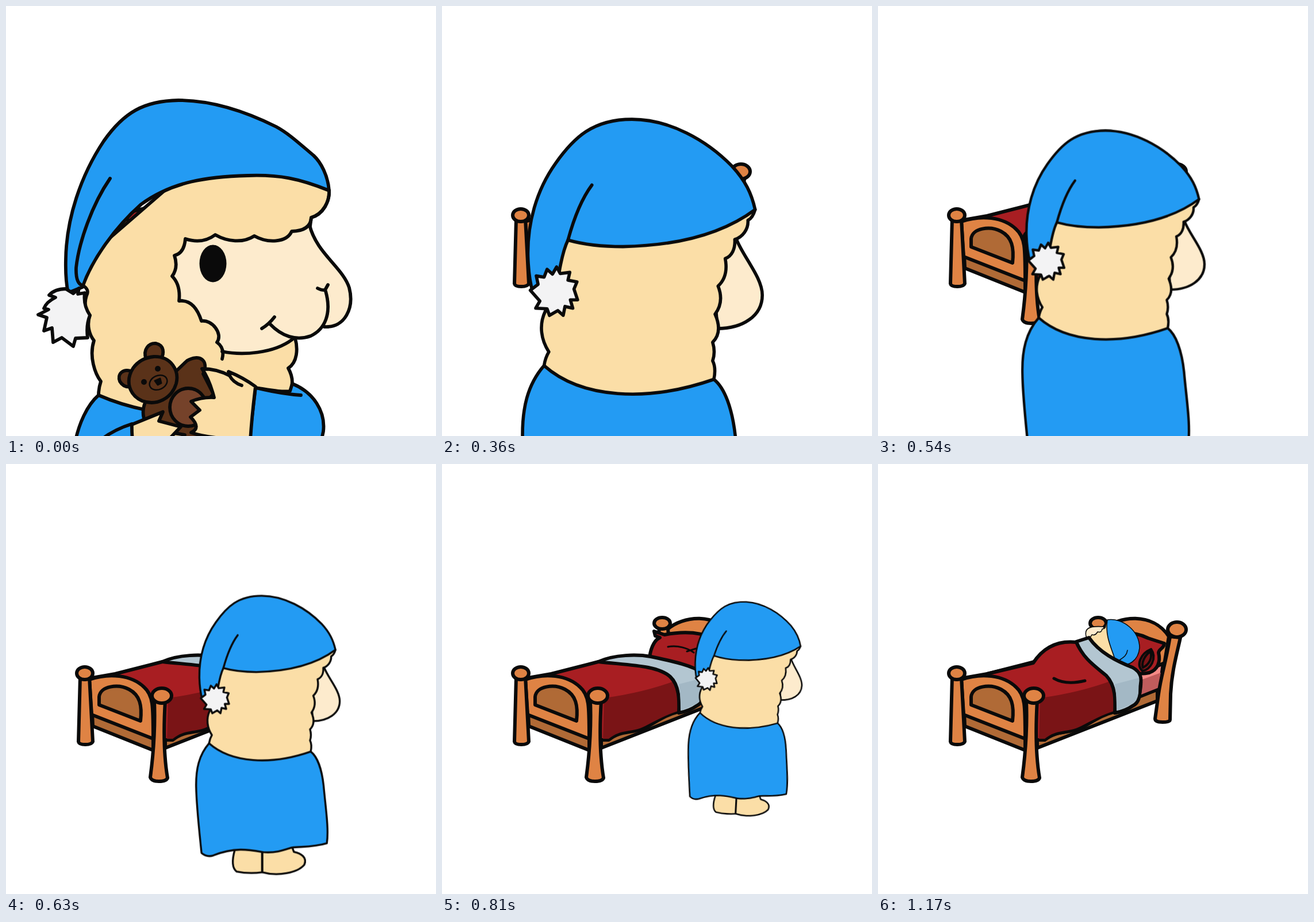
Animation, 748 px wide and 748 px high, one loop 1530 ms. Source, as an HTML page without scripts:

```html
<!DOCTYPE html>
<html lang="en">
<head>
<meta charset="utf-8">
<title>Bedtime</title>
<style>
html, body { margin: 0; width: 100%; height: 100%; overflow: hidden; background: #fff; }
svg { display: block; width: 100vw; height: 100vh; stroke: #0a0a0a; stroke-width: 6; stroke-linecap: round; stroke-linejoin: round; fill: none; }
.blue { fill: #239bf3; }
.wool { fill: #fbdea7; }
.skin { fill: #fdebcd; }
.fluff { fill: #f3f3f4; }
.wood { fill: #df8344; }
.shade { fill: #b06a36; }
.red { fill: #a81e22; }
.wine { fill: #7a1416; }
.sheet { fill: #b3c6d1; }
.bear { fill: #5a3219; }
.belly { fill: #75422a; }
.ink { fill: #0a0a0a; }
.flat { stroke: none; }
.line { fill: none; }
.side, .back, .sleep { animation: 1530ms step-end infinite; }
.side { animation-name: side; stroke-width: 5.8; }
.back { animation-name: back; stroke-width: 5.4; }
.sleep { animation-name: sleep; visibility: hidden; }
@keyframes side {
  0% { visibility: visible; transform: none; }
  17.647% { visibility: visible; transform: matrix(.906, .087, -.087, .906, 79, 20.8); }
  23.529%, 100% { visibility: hidden; }
}
@keyframes back {
  0% { visibility: hidden; }
  23.529% { visibility: visible; transform: matrix(1.04, 0, 0, 1.04, -18, -12); }
  29.412% { visibility: visible; transform: none; }
  35.294% { visibility: visible; transform: matrix(.79, 0, 0, .79, 131, 58); }
  41.176% { visibility: visible; transform: matrix(.623, 0, 0, .623, 236, 104); }
  47.059% { visibility: visible; transform: matrix(.53, .013, -.013, .53, 314, 121); }
  52.941% { visibility: visible; transform: matrix(.4773, .025, -.025, .4773, 374.4, 135.5); }
  58.824% { visibility: visible; transform: matrix(.41, .0215, -.0215, .41, 386, 181); }
  64.706% { visibility: visible; transform: matrix(-.3375, .0177, .0177, .3375, 603.5, 238.4); }
  70.588% { visibility: visible; transform: matrix(-.32, .017, .017, .32, 587, 234); }
  76.471%, 100% { visibility: hidden; }
}
@keyframes sleep {
  0% { visibility: hidden; }
  76.471%, 100% { visibility: visible; }
}
</style>
</head>
<body>
<svg viewBox="0 0 748 748">
  <!-- bed: head end -->
  <path class="wood" d="M378 284L376 310H394V284Z"/>
  <path class="wood" d="M393 287C418 265 477 256 506 300L496 360H400Z"/>
  <ellipse class="wood" cx="383" cy="277" rx="14" ry="10"/>
  <path class="shade" d="M277 478L486 392V412L277 494Z"/>
  <path fill="#f58a86" d="M440 372L496 347L490 391L440 410Z"/>
  <path class="flat" fill="#c05c5c" d="M443 381L492 363L488 389L443 407Z"/>
  <path class="wood" d="M508 300C501 345 493 365 488 400L482 443Q482 449 495 449T508 445L509 400C511 360 520 330 526 302Z"/>
  <ellipse class="wood" cx="520" cy="288" rx="16" ry="13"/>
  <!-- pillow -->
  <path class="red" d="M361 336C364 315 372 305 379 302L371 299L369 291L387 297C425 290 452 294 470 303Q485 308 498 312C498 321 489 321 488 328C492 345 486 358 472 363C440 371 395 350 361 336Z"/>
  <path class="wine" stroke-width="4" d="M475 322C456 330 449 350 460 360C474 358 486 338 475 322ZM474 326C462 334 458 348 461 354C471 349 478 338 474 326"/>
  <path stroke-width="3" d="M393 318C410 315 427 320 438 328M426 326L442 321"/>
  <!-- bedding -->
  <path class="red" d="M150 372L190 365L272 344C310 342 375 347 397 370C413 385 411 410 411 431C390 436 375 447 355 458C330 470 312 462 290 480L277 480L200 420Z"/>
  <path class="wine flat" d="M282 407Q350 398 409 376L410 430C390 436 373 446 353 456C330 468 312 460 290 478H280Z"/>
  <path class="sheet" d="M272 344C300 331 340 331 363 335C400 343 435 350 452 363C460 375 457 388 455 400Q454 415 444 420Q430 430 412 433C413 412 413 385 397 370C375 350 325 350 272 344Z"/>
  <path class="flat" fill="#a3b8c5" d="M412 383L455 372L453 399Q451 413 443 417L415 429Q415 400 412 383Z"/>

  <!-- asleep -->
  <g class="sleep">
    <g stroke-width="1.6">
      <path class="skin" d="M362 300C359 288 364 281 392 283L400 305L370 312Z"/>
      <path class="wool" d="M399 272L396 281Q396 287 390 287Q389 294 382 292Q378 299 372 297Q368 305 363 303L388 338L417 348L425 320Z"/>
      <path class="blue" d="M399 271C425 267 455 290 455 320C453 340 437 356 414 346C409 325 394 302 399 271Z"/>
      <path d="M434 324C432 337 422 338 414 346"/>
    </g>
    <path class="red" d="M190 365L270 346C283 326 305 306 345 310C355 335 380 350 398 368C413 385 411 410 411 431C390 436 375 447 355 458C330 470 312 462 290 480L277 480L200 400Z"/>
    <path class="wine flat" d="M282 407Q350 398 409 376L410 430C390 436 373 446 353 456C330 468 312 460 290 478H280Z"/>
    <path class="sheet" d="M345 309L367 302C385 328 415 343 443 354C459 363 459 375 456 386Q456 414 444 420Q430 430 412 433C413 412 414 386 397 368C375 350 356 337 345 309Z"/>
    <path class="flat" fill="#a3b8c5" d="M412 383L454 372L453 399Q451 413 443 417L415 429Q415 400 412 383Z"/>
    <path stroke-width="5" d="M306 373Q327 385 360 377"/>
  </g>

  <!-- bed: foot end -->
  <path class="shade" d="M150 433L256 474V498L151 456Z"/>
  <path class="wood" d="M145 375C180 363 218 367 240 388C256 402 256 420 256 478L149 436Z"/>
  <path class="shade" d="M162 419V405C164 386 195 382 214 392C233 402 237 420 234 447Z"/>
  <path class="wood" d="M129 370L126 483Q127 488 138 488T151 483L145 370Z"/>
  <ellipse class="wood" cx="137" cy="364" rx="14" ry="11"/>
  <path class="wood" d="M258 411C260 460 257 500 251 545Q253 552 266 552T281 546C274 505 274 460 277 411Z"/>
  <ellipse class="wood" cx="271" cy="403" rx="17" ry="13"/>

  <!-- seen from behind -->
  <g class="back">
    <path class="wool" d="M260 910C253 935 250 960 265 971Q300 978 336 973V905Z"/>
    <path class="wool" d="M337 905V973C380 985 435 975 454 952C463 932 445 920 425 916L419 900Z"/>
    <path class="skin" d="M509 400C520 430 553 465 553 495C553 530 520 551 478 551L470 450Z"/>
    <path class="wool" d="M190 522C179 545 183 570 196 590Q190 600 188 613L250 690H420L472 636Q476 617 470 605Q475 590 470 574C482 562 482 545 474 527C483 515 487 500 479 480C490 470 495 455 491 434C502 430 508 418 507 402C520 398 530 385 529 370Q537 366 541 352L228 390Z"/>
    <path class="blue" d="M541 352C535 325 525 304 502 279C460 236 398 201 335 201C270 201 238 231 207 275C175 320 160 375 161 430Q162 465 169 490L213 458C217 435 222 415 228 403C260 412 290 414 320 414C420 412 490 390 541 352Z"/>
    <path d="M268 311C250 335 237 370 228 403"/>
    <path class="fluff" d="M165 487L178 477L175 463L188 465L193 452L202 460L209 448L215 459L231 457L228 470L243 473L238 485L244 503L232 503L236 517L223 514L220 529L211 521L197 529L193 518L174 517L181 505Z"/>
    <path class="blue" d="M188 613C160 645 151 685 152 735C153 790 160 850 167 919Q182 932 200 926C260 902 300 910 340 917C375 920 400 910 419 904C450 901 480 903 517 892C523 850 513 790 508 732C503 685 490 650 472 636C360 675 250 668 188 613Z"/>
  </g>

  <!-- seen from the side -->
  <g class="side">
    <path class="wool" d="M133 486Q146 493 140 504C135 520 139 531 146 538C140 555 145 572 153 582C144 610 155 640 165 653Q161 665 161 677L230 760H430L494 670Q503 652 491 630C507 620 508 596 503 578L531 368C552 362 563 340 562 321C500 270 400 270 300 300L150 430Z"/>
    <path class="skin flat" d="M312 405C340 410 350 405 364 398Q400 417 432 400C455 413 488 412 497 392Q520 392 528 381C540 430 586 455 597 490C606 525 590 556 565 558L553 557Q540 575 498 580C465 605 410 608 376 600L367 585Q374 560 340 548Q332 515 301 513Q303 485 289 470Q300 455 293 434Q312 430 312 405Z"/>
    <path d="M528 381C540 430 586 455 597 490C606 525 590 560 554 558M498 580C465 605 410 608 376 601"/>
    <path d="M556 496C567 535 555 562 530 574C505 583 480 575 459 553M467 541Q457 554 445 561M542 491Q550 495 555 494L560 485"/>
    <path d="M562 321C563 340 552 362 531 368Q530 391 497 392C488 412 455 413 432 400C412 413 385 410 364 398C348 410 330 411 312 405Q310 430 293 434Q300 455 289 470Q304 485 301 513Q328 510 340 548C358 545 378 570 367 585Q381 595 376 614"/>
    <ellipse class="ink flat" cx="360" cy="448" rx="23.5" ry="32.5"/>
    <path class="blue" d="M562 321C560 295 548 272 535 260C510 239 492 222 470 210C420 185 360 164 300 164C240 165 205 185 170 235C130 295 105 370 104 440Q103 475 108 499L133 489C150 440 190 385 235 345C290 305 350 297 420 295C475 293 510 300 562 321Z"/>
    <path d="M181 300C150 345 127 410 122 455Q121 483 133 486"/>
    <path class="fluff" d="M137 499L125 501L127 491L117 500L104 492Q85 492 75 503L86 507Q70 515 66 526L74 528L56 537L71 542L66 565L80 560L82 585L97 577L117 592L121 578L142 577Q139 555 146 538Q134 520 137 499Z"/>
    <path class="blue" d="M161 677C140 695 127 728 121 755Q116 775 118 810H250L245 703Q200 694 161 677Z"/>
    <path class="blue" d="M434 664C460 668 480 672 494 670L498 657C535 672 556 705 552 740Q546 775 520 800H420L425 740Z"/>
    <path d="M434 664Q480 675 513 677M167 753Q190 736 219 727"/>
    <!-- teddy -->
    <path class="bear" d="M245 685C234 700 235 735 265 740Q290 742 311 746Q305 762 318 767T337 755L346 690L361 675L343 640C354 615 335 605 315 617L296 635Z"/>
    <path class="bear" d="M244 615C237 597 249 586 261 587C275 590 276 604 269 615Z"/>
    <path class="bear" d="M222 637C203 628 193 641 198 653Q205 665 220 662Z"/>
    <path class="bear" d="M257 610C287 609 302 634 296 657C288 683 262 696 237 687C214 677 207 652 221 630Q234 612 257 610Z"/>
    <ellipse cx="265" cy="655" rx="16" ry="12" stroke-width="2.5" transform="rotate(-25 265 655)"/>
    <path class="ink" stroke-width="3" d="M259 652L268 648L270 656L264 659Z"/>
    <circle class="ink flat" cx="264" cy="631" r="5"/>
    <circle class="ink flat" cx="240" cy="654" r="5"/>
    <ellipse class="belly" cx="317" cy="698" rx="32" ry="33"/>
    <!-- hands -->
    <path class="wool" d="M219 728L273 706L266 722L304 732L287 750L321 768L285 810H229Q218 760 219 728Z"/>
    <path class="wool" d="M341 631C360 631 374 635 389 643L387 636Q412 646 434 662Q428 710 425 755C390 753 350 752 322 742Q340 734 321 715L337 703L322 688Q340 680 362 681Q354 650 341 631Z"/>
    <path d="M389 643Q395 655 410 660"/>
  </g>
</svg>
</body>
</html>
```
